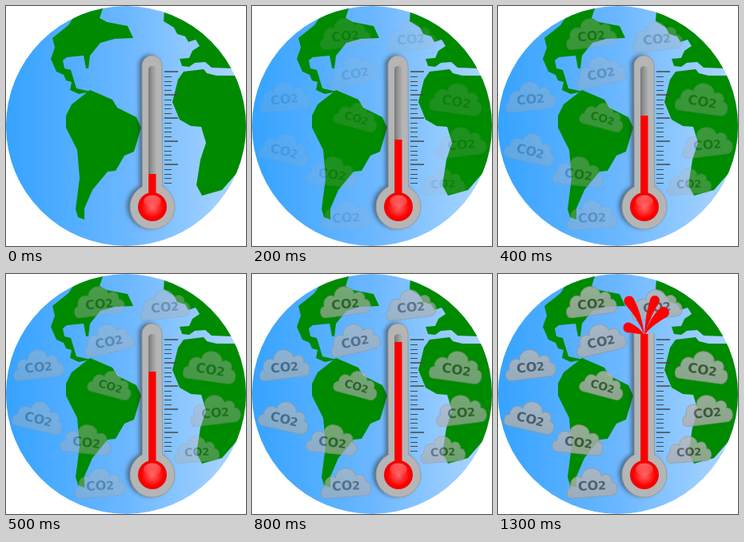
An HTML page with a canvas for the animation above (1500 ms loop, 300 by 300 pixels).

```html
<!DOCTYPE html>
<html lang="en">
<head>
<meta charset="utf-8">
<title>Warming globe</title>
<style>
html, body { margin: 0; width: 100%; height: 100%; overflow: hidden; background: #fff; }
canvas { display: block; width: 300px; height: 300px; }
</style>
</head>
<body>
<canvas id="stage" width="300" height="300"></canvas>
<script>
const SIZE = 300, LOOP = 1500, STEP = 100;
const RED = '#ff0000';
const MOUTH = { x: 183, y: 76 };
const ctx = document.getElementById('stage').getContext('2d');

// Coastlines by their key points; the globe's rim cuts the rest
const coasts = [
  'M86 12 78 24 58 40 61 52 56 66 63 82 72 86 75 93 82 95 80 105 91 110 106 107' +
  ' 88 103 81 80 73 78 71 68 76 64 97 62 100 78 103 78 105 62 118 46 136 41' +
  ' 159 40 152 25 126 20 117 15 122 0Z',
  'M75 137 82 123 105 105 133 117 139 127 163 139 169 152 160 182 148 187' +
  ' 137 206 127 207 108 230 98 253 98 267 90 264 87 254 92 215 89 180 75 152Z',
  'M198 5 197 19 210 27 214 35 224 38 228 45 237 42 242 50 233 56 229 65 217 66' +
  ' 220 75 229 76 236 71 249 70 257 77 284 78 300 70 270 0Z',
  'M215 92 222 82 247 79 251 84 263 87 290 87 305 100 305 190 270 230 245 237' +
  ' 238 224 243 192 250 171 244 151 231 150 217 142 208 120Z'
].map(d => new Path2D(d));

// Label centre, tilt in degrees, scale
const clouds = [
  [117, 37, -6], [199, 41, -6], [129, 84, -12], [41, 116, -6],
  [131, 140, 16, .87], [256, 119, 9, 1.04], [41, 181, 14],
  [262, 173, -6], [101, 210, 7], [239, 222, -3, .89], [118, 264, -3]
];
const cloudShape = new Path2D(
  'M-27 15C-34 14 -34 2 -27 1C-28 -10 -19 -14 -13 -10' +
  'C-12 -25 10 -25 12 -11C20 -16 26 -9 24 -3C33 -3 33 13 24 14Z');

// Head centre relative to the tube's mouth, head radius
const drops = [[-20, -9, 6.5], [-19, -42, 6.5], [13, -43, 6], [24, -28, 7]];

// Top of the column: [step, y]
const column = [[0, 210], [1, 182], [5, 122], [7, 95], [9, 75]];

function tween(keys, t) {
  const i = keys.findIndex(k => k[0] > t);
  if (i < 0) return keys[keys.length - 1][1];
  const [t0, a] = keys[i - 1], [t1, b] = keys[i];
  return a + (b - a) * (t - t0) / (t1 - t0);
}

function layer(paint) {
  const c = document.createElement('canvas');
  c.width = c.height = SIZE;
  paint(c.getContext('2d'));
  return c;
}

function gradient(g, x0, y0, x1, y1, ...colors) {
  const fill = g.createLinearGradient(x0, y0, x1, y1);
  colors.forEach((c, i) => fill.addColorStop(i / (colors.length - 1), c));
  return fill;
}

function paintGlobe(g) {
  g.beginPath();
  g.arc(150, 150, 150, 0, Math.PI * 2);
  g.clip();
  g.fillStyle = gradient(g, 0, 0, SIZE, 0, '#35a3ff', '#6bb7ff', '#b0d8ff');
  g.fillRect(0, 0, SIZE, SIZE);
  g.fillStyle = '#008a00';
  coasts.forEach(c => g.fill(c));
}

function paintCloud(g, [x, y, tilt, scale = 1]) {
  g.save();
  g.translate(x, y);
  g.rotate(tilt * Math.PI / 180);
  g.scale(scale, scale);
  g.fillStyle = gradient(g, 0, -20, 0, 15, '#b8b8b8', '#adadad');
  g.strokeStyle = '#989898';
  g.fill(cloudShape);
  g.stroke(cloudShape);
  g.fillStyle = '#4c4c4c';
  g.font = 'bold 16px "DejaVu Sans", sans-serif';
  g.fillText('CO', -18, 6);
  g.font = 'bold 14.5px "DejaVu Sans", sans-serif';
  g.fillText('2', 7, 6);
  g.restore();
}

function bodyPath(g) {
  const neck = Math.asin(12.5 / 28);
  g.beginPath();
  g.arc(182.5, 74.5, 12.5, Math.PI, 0);
  g.arc(183, 251, 28, -Math.PI / 2 + neck, Math.PI * 1.5 - neck);
  g.closePath();
}

function paintBody(g) {
  g.save();
  g.shadowColor = 'rgba(50,50,50,.55)';
  g.shadowBlur = 5;
  g.shadowOffsetX = -4;
  g.shadowOffsetY = -1;
  bodyPath(g);
  g.fillStyle = '#b5b5b5';
  g.fill();
  g.restore();
  g.strokeStyle = '#999';
  g.stroke();
  g.beginPath();
  g.roundRect(178, 75, 9.5, 165, [4.5, 4.5, 0, 0]);
  g.fillStyle = gradient(g, 178, 0, 188, 0, '#777', '#999', '#b0b0b0');
  g.fill();
}

function paintTicks(g) {
  g.fillStyle = '#484848';
  for (let i = 0; i < 25; i++) {
    const y = 82 + i * 5.8;
    if (i % 5 === 0) g.fillRect(198, y - .7, 17, 1.5);
    else g.fillRect(198, Math.round(y), 9, 1);
  }
}

function paintMercury(g, top) {
  g.fillStyle = RED;
  g.fillRect(178.3, top, 9.2, 240 - top);
  const ball = g.createRadialGradient(183, 252, 1, 183, 251, 18);
  ball.addColorStop(0, '#ff6060');
  ball.addColorStop(.75, RED);
  ball.addColorStop(1, '#f00000');
  g.beginPath();
  g.arc(183, 251, 18, 0, Math.PI * 2);
  g.fillStyle = ball;
  g.fill();
  g.beginPath();
  g.ellipse(183, 244, 11, 7.5, 0, 0, Math.PI * 2);
  g.fillStyle = gradient(g, 0, 236, 0, 252, 'rgba(255,170,170,.6)', 'rgba(255,130,130,.15)');
  g.fill();
}

// A drop rises from the mouth, then bends outwards to its head
function paintDrop(g, [x, y, r]) {
  const bendX = x * .35, bendY = y * .6;
  const angle = Math.atan2(y - bendY, x - bendX);
  const sideX = -Math.sin(angle) * r * .6, sideY = Math.cos(angle) * r * .6;
  g.beginPath();
  g.moveTo(0, 0);
  g.quadraticCurveTo(bendX - sideX, bendY - sideY,
    x + Math.sin(angle) * r, y - Math.cos(angle) * r);
  g.arc(x, y, r, angle - Math.PI / 2, angle + Math.PI / 2);
  g.quadraticCurveTo(bendX + sideX, bendY + sideY, 0, 0);
  g.fillStyle = RED;
  g.fill();
}

function paintBurst(g, grow) {
  g.save();
  g.translate(MOUTH.x, MOUTH.y);
  g.scale(grow, grow);
  drops.forEach(d => paintDrop(g, d));
  g.restore();
}

const globe = layer(paintGlobe);
const body = layer(paintBody);
const ticks = layer(paintTicks);
const smog = layer(g => clouds.forEach(c => paintCloud(g, c)));

// Steps are 100 ms long; the ninth and the last are held twice as long
function stepAt(time) {
  const n = Math.floor((time % LOOP) / STEP);
  return Math.min(12, n > 8 ? n - 1 : n);
}

function draw(time) {
  const step = stepAt(time);
  const burst = Math.max(0, (step - 9) / 3);
  ctx.clearRect(0, 0, SIZE, SIZE);
  ctx.drawImage(globe, 0, 0);
  ctx.globalAlpha = .8 * Math.min(1, step / 10);
  ctx.drawImage(smog, 0, 0);
  ctx.globalAlpha = 1;
  // The cap is blown off once the column bursts
  const cut = burst > 0 ? 74 : 0;
  ctx.drawImage(body, 0, cut, SIZE, SIZE - cut, 0, cut, SIZE, SIZE - cut);
  ctx.drawImage(ticks, 0, 0);
  paintMercury(ctx, tween(column, step));
  if (burst > 0) paintBurst(ctx, burst);
}

const start = performance.now();
function tick() {
  draw(performance.now() - start);
  requestAnimationFrame(tick);
}
tick();
</script>
</body>
</html>
```
